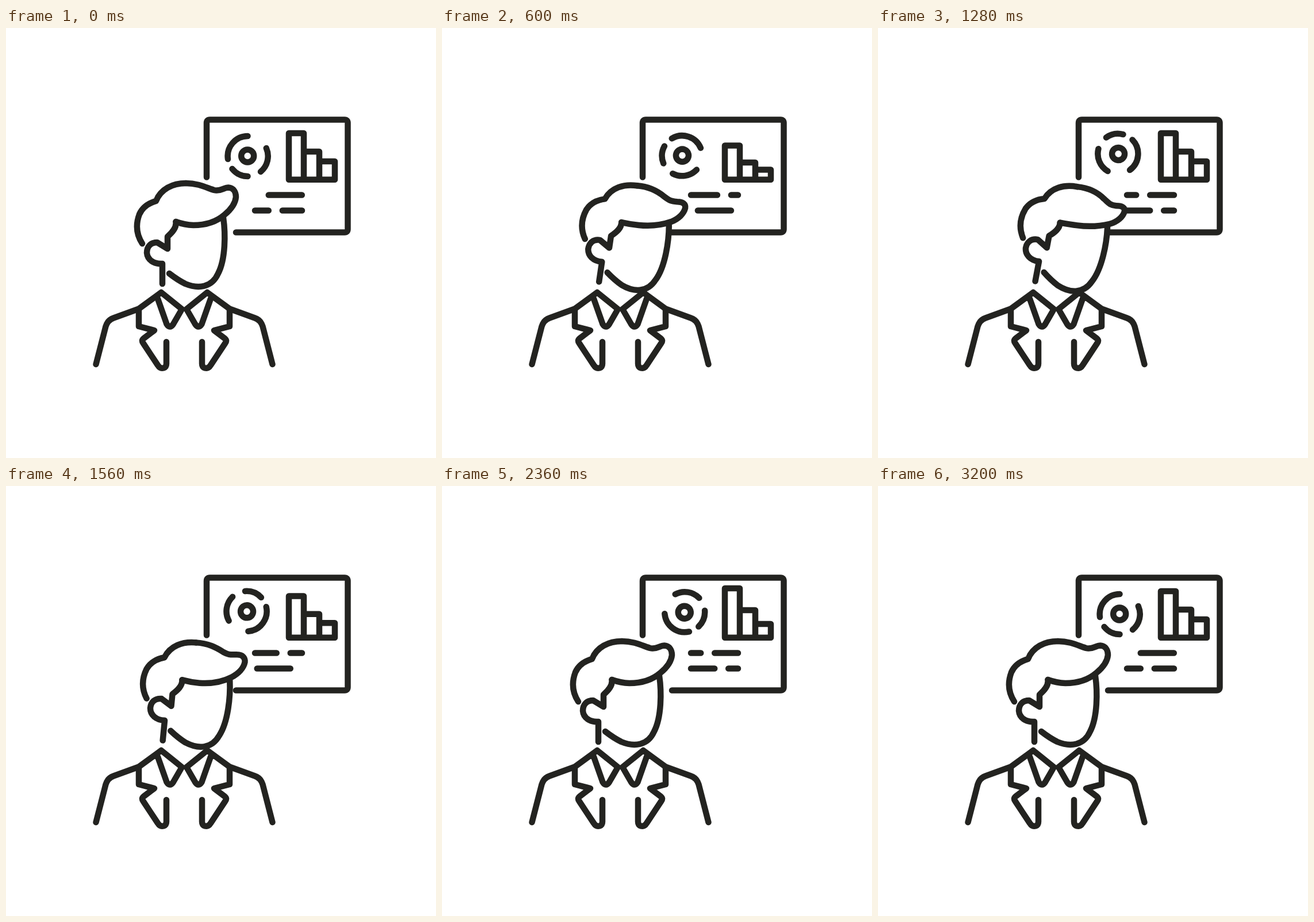
Animation, 748 px wide and 748 px high, one loop 3.24 s. Source, as an HTML page:

```html
<!DOCTYPE html>
<html lang="en">
<head>
<meta charset="utf-8">
<title>Presenter</title>
<style>
html, body { margin: 0; width: 100%; height: 100%; overflow: hidden; background: #fff; }
svg { display: block; width: 100vw; height: 100vh; }
.ink { fill: none; stroke: #232320; stroke-width: 10.5; stroke-linecap: round; stroke-linejoin: round; }
.row { stroke-dasharray: 58 24; }
</style>
</head>
<body>
<svg viewBox="0 0 748 748">
  <g class="ink">
    <path d="M349 259.5V165Q349 159.5 354.5 159.5H589Q594.5 159.5 594.5 165V350Q594.5 355.5 589 355.5H400"/>

    <g id="dial">
      <circle cx="420.2" cy="222.5" r="11"/>
      <path d="M386 228A35 35 0 0 1 420.5 188M452.8 209A35 35 0 0 1 443 250M420.5 258A35 35 0 0 1 393.5 245"/>
    </g>

    <path id="bars"/>

    <path class="row" d="M433 290.5H515"/>
    <path class="row" d="M433 317.5H515"/>

    <g id="half">
      <path d="M156.5 585L173.5 519Q177 508 187 504.5L231 488.5L270 460L306 489L291 515Q285 524 279.5 515L264 471"/>
      <path d="M231 490V519L258 526L239.500 540Q235 543.500 238.500 548L264 586.500Q268 593 274 591.500Q279 590 279 584V546"/>
    </g>
    <use href="#half" transform="translate(620 0) scale(-1 1)"/>

    <g id="head">
      <path d="M237 375C226 358 226 340 232 324C237 313 247 305 261 301C269 280 290 270 313 270"/>
      <path id="quiff"/>
      <path d="M295.500 337C297 347 290 355 281 363V384L263 373C251 373 245 381 245 391C246 403 257 411 272 410V445"/>
      <path d="M378 330C382 358 382 402 369 427C358 452 334 454 312 445C302 440 293 434 284 427"/>
    </g>
  </g>
</svg>
<script>
const STEP = 40, STEPS = 81, LAST = STEPS - 1, MAX_TILT = 10.7;

const tilt = curve([[0, 0], [10, 10.3], [23, 4.6], [32, MAX_TILT], [47, -0.8], [59, 0], [80, 0]]);
const tops = [
  [183, 208, 196, 183, 202, 178, 183],
  [215, 235, 231, 215, 232, 216, 215],
  [232, 245, 247, 232, 246, 240, 232]
].map(ys => curve([0, 8, 23, 32, 47, 59, 80].map((x, i) => [x, ys[i]])));

// The front of the hair flattens as the head leans forward.
const quiffShape = blend(
  'M313 270C335 270 349 278 362 282C373 285 378 277.5 387 277.5C396 278 400 286 400 294C399 305 391 316 380 325C365 338 346 343 326 343C313 342.5 304 340 295.5 337',
  'M313 270C334 268 350 273 363 282C373 288 375 291 386 290C396 288 402 290 402 297C401 307 393 317 381 323C365 330 346 335 326 336C313 337 304 337 295.5 337'
);

const dial = document.getElementById('dial');
const bars = document.getElementById('bars');
const head = document.getElementById('head');
const quiff = document.getElementById('quiff');
const rows = document.querySelectorAll('.row');

// Mixes two paths that share the same commands.
function blend(from, to) {
  const number = /[\d.]+/g;
  const ends = to.match(number);
  return k => {
    let i = 0;
    return from.replace(number, n => +n + (ends[i++] - n) * k + ' ');
  };
}

// Smooth curve through the points that never overshoots them.
function curve(pts) {
  const slope = pts.slice(1).map(([x, y], i) => (y - pts[i][1]) / (x - pts[i][0]));
  const tan = pts.map((_, i) => {
    const a = slope[i - 1], b = slope[i];
    return a * b > 0 ? 2 * a * b / (a + b) : 0;
  });
  return x => {
    let i = 0;
    while (i < pts.length - 2 && x > pts[i + 1][0]) i++;
    const [x0, y0] = pts[i], [x1, y1] = pts[i + 1];
    const w = x1 - x0, u = (x - x0) / w, v = 1 - u;
    return y0 * v * v * (1 + 2 * u) + y1 * u * u * (3 - 2 * u)
      + w * u * v * (tan[i] * v - tan[i + 1] * u);
  };
}

function draw(step) {
  const turn = step / LAST, lean = tilt(step);
  dial.setAttribute('transform', `rotate(${360 * turn} 419.7 220.4)`);
  head.setAttribute('transform', `rotate(${lean} 297 451)`);
  quiff.setAttribute('d', quiffShape(lean / MAX_TILT));

  const [a, b, c] = tops.map(top => top(step));
  bars.setAttribute('d',
    `M492 263.8V${a}H518V263.8M518 ${b}H545V263.8M545 ${c}H572V263.8H492`);

  // Three laps per loop; the tiny shift avoids a stray dot at the line start.
  rows.forEach((row, i) => {
    row.style.strokeDashoffset = -(3 * 82 * turn + 24 * (i + 1) - 0.2);
  });
}

const start = performance.now();
function tick() {
  const t = performance.now() - start;
  draw(Math.floor(t / STEP) % STEPS);
  requestAnimationFrame(tick);
}
tick();
</script>
</body>
</html>
```
